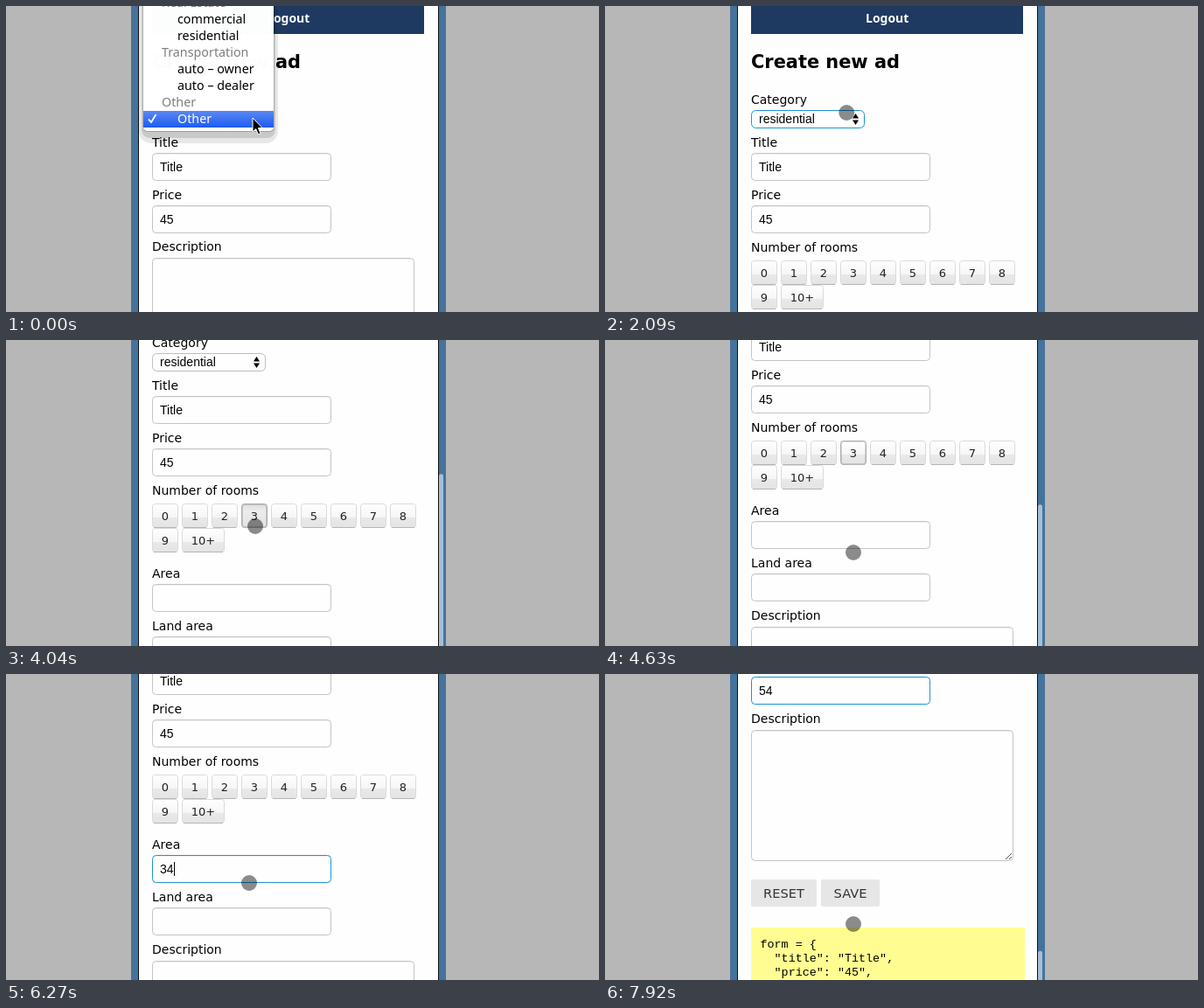
Animation, 678 px wide and 350 px high, one loop 8 s. Source, as an HTML page with a canvas:

```html
<!DOCTYPE html>
<html lang="en">
<head>
<meta charset="utf-8">
<title>Create new ad</title>
<style>
  html, body { margin: 0; width: 100%; height: 100%; overflow: hidden; background: #b7b7b7; }
  canvas { display: block; }
</style>
</head>
<body>
<canvas id="stage" width="678" height="350"></canvas>
<script>
const ctx = document.getElementById('stage').getContext('2d');
const LOOP = 8000, STEP = 150;
const MENU_CLOSES = 1940, ROOM_TAP = 4040, AREA_TAP = 5080, LAND_TAP = 6720;

const FONT = {
  label: '14px "DejaVu Sans", sans-serif',
  heading: 'bold 20.9px "DejaVu Sans", sans-serif',
  room: '13px "DejaVu Sans", sans-serif',
  action: '14.6px "DejaVu Sans", sans-serif',
  field: '14px "Liberation Sans", sans-serif',
  menu: '14.3px "Noto Sans", sans-serif',
  nav: 'bold 14px "Noto Sans", sans-serif',
  code: '13.4px "Liberation Mono", monospace'
};

// time, pointer x, pointer y, page scroll
const poses = [
  [0, 282, 128, 0], [750, 282, 128, 0], [1200, 279.5, 48, 0], [1500, 278, 30, 0],
  [1939, 278, 30, 0], [MENU_CLOSES, 277, 80, 0], [2540, 274, 248, 0], [2840, 274, 248, 32],
  [3440, 274, 248, 104], [3740, 285, 213, 104], [4190, 285, 213, 104], [4340, 284, 243, 104],
  [4630, 284, 243, 176], [AREA_TAP, 279, 228, 176], [6120, 279, 228, 176], [6270, 278, 239, 176],
  [LAND_TAP, 284, 286, 176], [7470, 284, 286, 176], [7920, 284, 286, 440], [LOOP, 284, 286, 440]
];

// Motion advances in discrete steps, counted from each pose.
function poseAt(t) {
  let i = 0;
  while (i < poses.length - 2 && poses[i + 1][0] <= t) i++;
  const from = poses[i], to = poses[i + 1];
  const held = Math.floor((t - from[0]) / STEP) * STEP;
  const k = held / (to[0] - from[0]);
  const [, x, y, scroll] = from.map((v, n) => v + (to[n] - v) * k);
  return { x, y, scroll: Math.round(scroll) };
}

function text(str, x, y, font, color = '#000', align = 'left') {
  ctx.font = font;
  ctx.fillStyle = color;
  ctx.textAlign = align;
  ctx.fillText(str, x, y);
}

function rect(x, y, w, h, fill) {
  ctx.fillStyle = fill;
  ctx.fillRect(x, y, w, h);
}

function rounded(x, y, w, h, radius, fill, stroke) {
  ctx.beginPath();
  ctx.roundRect(x, y, w, h, radius);
  if (fill) { ctx.fillStyle = fill; ctx.fill(); }
  if (stroke) { ctx.strokeStyle = stroke; ctx.lineWidth = 1; ctx.stroke(); }
}

function polygon(points, fill) {
  ctx.beginPath();
  points.forEach(([x, y]) => ctx.lineTo(x, y));
  ctx.closePath();
  ctx.fillStyle = fill;
  ctx.fill();
}

function gradient(y0, y1, ...stops) {
  const g = ctx.createLinearGradient(0, y0, 0, y1);
  stops.forEach(([at, color]) => g.addColorStop(at, color));
  return g;
}

const label = (str, y) => text(str, 167, y, FONT.label);

function box(y, w, h, focused) {
  rounded(167.5, y + .5, w - 1, h - 1, 4, '#fefefe', focused ? '#1b93d8' : '#c4c4c4');
  rect(170, y + 1, w - 6, 1, 'rgba(0,0,0,.06)');
}

function field(name, y, value, focused, caret) {
  label(name, y - 7);
  box(y, 205, 32, focused);
  text(value, 176, y + 21, FONT.field);
  if (caret) rect(176 + Math.round(ctx.measureText(value).width), y + 8, 1, 16, '#000');
}

function textarea(y) {
  label('Description', y - 8);
  box(y, 300, 150);
  ctx.strokeStyle = '#555';
  ctx.lineWidth = 1;
  ctx.beginPath();
  for (const d of [7, 3]) {
    ctx.moveTo(465 - d, y + 148);
    ctx.lineTo(465, y + 148 - d);
  }
  ctx.stroke();
}

function select(focused) {
  label('Category', 112);
  rounded(167.5, 119.5, 129, 20, 5, '#fefefe', focused ? '#1b93d8' : '#bdbdbd');
  text('residential', 176, 134, FONT.field);
  polygon([[283, 128.5], [290, 128.5], [286.5, 123]], '#000');
  polygon([[283, 130.5], [290, 130.5], [286.5, 136]], '#000');
}

function roomButton(name, x, y, w, state) {
  const shades = state === 'pressed'
    ? [[0, '#dcdcdc'], [.3, '#ececec'], [1, '#e2e2e2']]
    : [[0, '#fff'], [.56, '#f6f6f6'], [.57, '#e9e9e9'], [1, '#e4e4e4']];
  rounded(x + .5, y + .5, w - 1, 27, 3, gradient(y, y + 28, ...shades), state ? '#adadad' : '#dadada');
  if (state) rounded(x + 1.5, y + 1.5, w - 3, 25, 2, null, 'rgba(0,0,0,.14)');
  rect(x + 2, y + 27, w - 4, 1, '#b5b5b5');
  text(name, x + w / 2, y + 19, FONT.room, '#222', 'center');
}

function rooms(t) {
  label('Number of rooms', 281);
  for (let n = 0; n <= 10; n++) {
    const selected = n === 3 && t >= ROOM_TAP && t < AREA_TAP;
    const state = selected && (t < 4340 ? 'pressed' : 'focused');
    roomButton(n < 10 ? String(n) : '10+', 167 + n % 9 * 34, n < 9 ? 291 : 319, n < 10 ? 30 : 49, state);
  }
}

function actionButton(name, x, w) {
  rounded(x, 675, w, 31, 2, '#e6e6e6');
  text(name, x + w / 2, 696, FONT.action, '#333', 'center');
}

function page(t) {
  rect(167, -60, 311, 92, '#1f3a61');
  text('Logout', 298, 19, FONT.nav, '#fff');
  text('Create new ad', 167, 71, FONT.heading);
  if (t >= MENU_CLOSES) select(t < ROOM_TAP);
  field('Title', 168, 'Title');
  field('Price', 228, '45');
  if (t < MENU_CLOSES) return textarea(288);

  const inArea = t >= AREA_TAP && t < LAND_TAP, inLand = t >= LAND_TAP;
  rooms(t);
  field('Area', 383, t < 5680 ? '' : t < 5970 ? '3' : '34', inArea, inArea);
  field('Land area', 443, t < 7170 ? '' : '54', inLand, inLand && t < 7620);
  textarea(504);
  actionButton('RESET', 167, 75);
  actionButton('SAVE', 247, 67);
  rect(167, 730, 313, 200, '#fffd91');
  ['form = {', '  "title": "Title",', '  "price": "45",', '  "rooms": "3",']
    .forEach((line, i) => text(line, 177.5, 753 + i * 16, FONT.code));
}

function checkMark(color) {
  ctx.strokeStyle = color;
  ctx.lineWidth = 1.8;
  ctx.beginPath();
  ctx.moveTo(163, 129.5);
  ctx.lineTo(166, 133);
  ctx.lineTo(171.5, 124);
  ctx.stroke();
}

const menuRows = [
  ['Real Estate', true], ['commercial'], ['residential'], ['Transportation', true],
  ['auto – owner'], ['auto – dealer'], ['Other', true], ['Other']
];

function menu(t, pointerY) {
  // Shadow falls only outside the panel, which is slightly translucent.
  ctx.save();
  ctx.beginPath();
  ctx.rect(152, 0, 170, 170);
  ctx.roundRect(157, -20, 149, 163, 5);
  ctx.clip('evenodd');
  rounded(152, -20, 159, 177, 14, 'rgba(0,0,0,.09)');
  rounded(155, -20, 153, 171, 9, 'rgba(0,0,0,.13)');
  rounded(156.5, -20, 150, 164, 5, 'rgba(0,0,0,.22)');
  ctx.restore();
  rounded(157, -20, 149, 163, [0, 0, 5, 5], `rgba(255,255,255,${t < 900 ? .99 : .95})`);

  menuRows.forEach(([name, isGroup], i) => {
    const top = 19 * i - 13;
    const hot = !isGroup && pointerY >= top && pointerY < top + 19;
    if (hot) rect(157, top, 149, 19, gradient(top, top + 19, [0, '#5b88f3'], [1, '#1c5cf2']));
    const color = hot ? '#fff' : isGroup ? '#7d7d7d' : '#000';
    text(name, isGroup ? 178 : 196, top + 14, FONT.menu, color);
    if (i === menuRows.length - 1) checkMark(color);
  });
}

function arrow(x, y) {
  const outline = [[0, 0], [0, 16], [3.7, 12.6], [6.4, 18.8], [9, 17.7], [6.4, 11.6], [11.2, 11.6]];
  const points = outline.map(([dx, dy]) => [x + dx, y + dy]);
  polygon(points, '#000');
  ctx.strokeStyle = '#fff';
  ctx.lineWidth = 1;
  ctx.stroke();
}

function touch(x, y) {
  ctx.beginPath();
  ctx.arc(x, y, 9, 0, 2 * Math.PI);
  ctx.fillStyle = 'rgba(0,0,0,.45)';
  ctx.fill();
}

function scrollbar(t, scroll) {
  const alpha = t < 2690 ? 0 : t < 5380 ? 1 : t < 5530 ? .5 : t < 7620 ? 0 : 1;
  const top = 102.5 + .487 * scroll;
  ctx.globalAlpha = alpha;
  rounded(495, top, 5, 400, 2.5, '#a6bfd5');
  ctx.globalAlpha = 1;
}

function draw(t) {
  const { x, y, scroll } = poseAt(t);
  rect(0, 0, 678, 350, '#b7b7b7');
  rect(143, 0, 360, 350, '#46739b');
  rect(151, 0, 344, 350, '#111');
  rect(152, 0, 342, 350, '#fefefe');

  ctx.save();
  ctx.beginPath();
  ctx.rect(152, 0, 342, 350);
  ctx.clip();
  ctx.translate(0, -scroll);
  page(t);
  ctx.restore();

  scrollbar(t, scroll);
  if (t < MENU_CLOSES) {
    menu(t, y);
    arrow(x, y);
  } else {
    touch(x, y);
  }
}

const start = performance.now();
function frame() {
  draw((performance.now() - start) % LOOP);
  requestAnimationFrame(frame);
}
frame();
</script>
</body>
</html>
```
